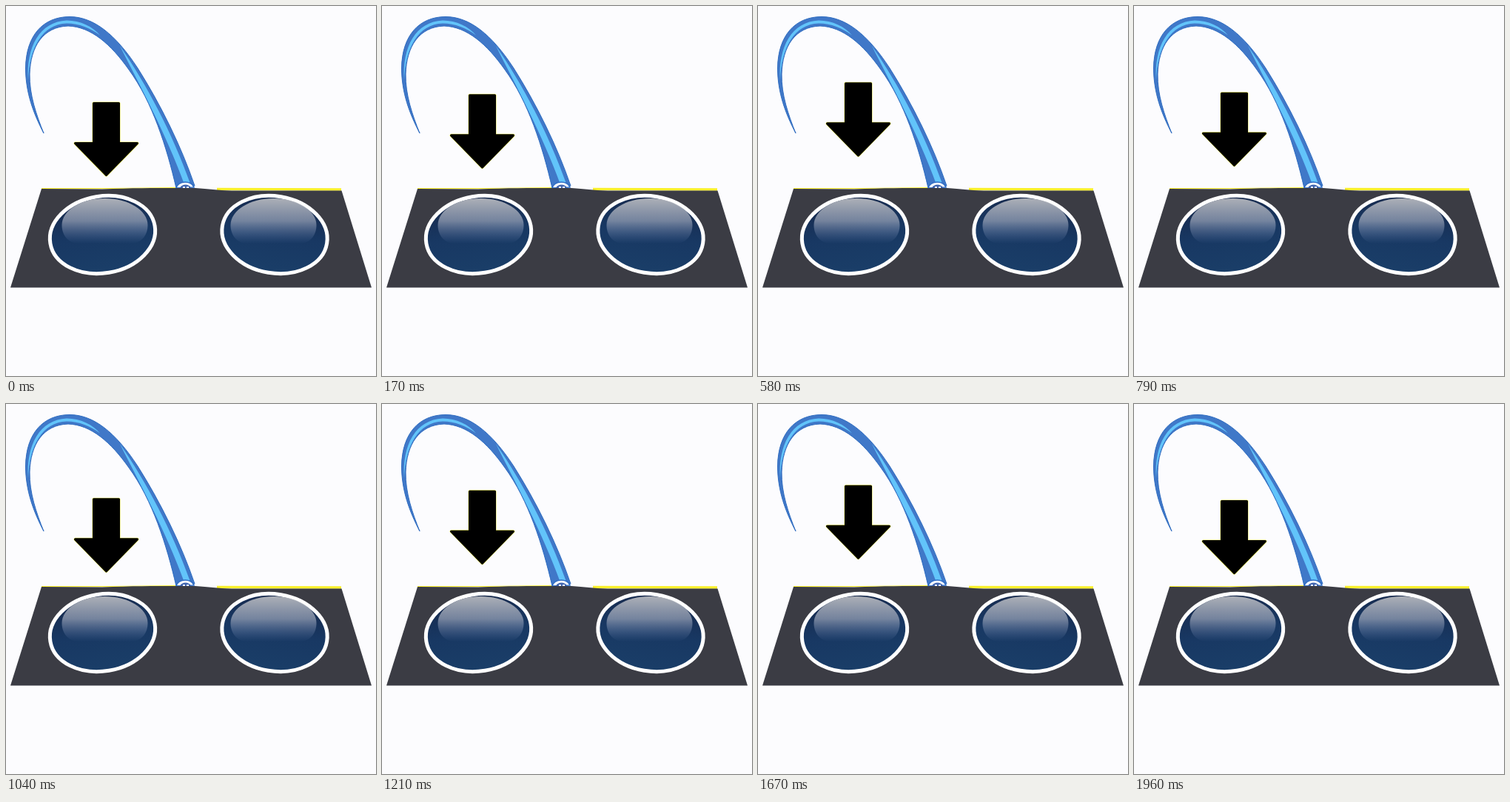
Recreate the animation shown at these times as an HTML page. Size 500 by 500 pixels, loop 2 s.

```html
<!DOCTYPE html>
<html lang="en">
<head>
<meta charset="utf-8">
<title>Glasses and arrow</title>
<style>
  html, body { margin: 0; width: 100%; height: 100%; overflow: hidden; background: #fcfcfe; }
  svg { display: block; width: 100vw; height: 100vh; }
</style>
</head>
<body>
<svg viewBox="0 0 500 500">
  <defs>
    <linearGradient id="glass" x1="0" y1="0" x2="0" y2="1">
      <stop offset="0" stop-color="#17294c"/>
      <stop offset=".5" stop-color="#183863"/>
      <stop offset="1" stop-color="#1a3e68"/>
    </linearGradient>
    <linearGradient id="shine" x1="0" y1="0" x2="0" y2="1">
      <stop offset="0" stop-color="#b4b7bd" stop-opacity=".95"/>
      <stop offset=".5" stop-color="#a4adc0" stop-opacity=".66"/>
      <stop offset="1" stop-color="#6c86b8" stop-opacity="0"/>
    </linearGradient>
    <ellipse id="lens" rx="71.6" ry="52" fill="url(#glass)" stroke="#fff" stroke-width="5"/>
    <path id="gloss" fill="url(#shine)"
      d="M75.500 296C75.500 276 102 260 133.500 260S191.500 276 191.500 296C191.500 310 183 321 168 321H99C84 321 75.500 310 75.500 296Z"/>
    <path id="pointer" d="M118.500 131.500H152.500V185.500H177.500L135.500 228.500L93.500 185.500H118.500Z"/>
  </defs>

  <!-- temple -->
  <path fill="#4078c8" stroke="#2f6cc0" stroke-width="1"
    d="M51 172C37 145 26.500 117 26.500 84C27 40 50 14.500 86 14.500C118 14.500 148 38 178 84C209 133 237 190 255 243L230 246C217 190 198 130 166 86C142 52 115 28 84 27C50 28 33 55 32 92C31.500 120 41 147 51 172Z"/>
  <g fill="#62c4fa">
    <path d="M30 100C27 55 46 21 82 19.500C101 19.500 117 28 127 39.500C114 30 99 23.500 82 23.500C49 25 32 55 30 100Z"/>
    <path d="M154 54C190 106 224 170 249 240L241 241C216 172 180 106 154 54Z"/>
  </g>
  <path d="M230 246C232 236 251 235 254 245Z" fill="#f4f8ff" stroke="#2f6cc4" stroke-width="1.500"/>
  <path d="M235 246C237 240 248 240 250 246" fill="#3c62ae"/>
  <path d="M239 245h3M244 245h3" stroke="#fff" stroke-width="2"/>

  <!-- frame -->
  <g fill="none" stroke="#fbf02a">
    <path d="M48 246.500L140 246.500L229 245.500"/>
    <path d="M285 247.400L453 248" stroke-width="3.400"/>
  </g>
  <path fill="#3b3c44" d="M48 247L130 247.500C170 246 200 246 230 246H256C274 247 285 249 305 249.500H453.500L494 380.500H6Z"/>
  <use href="#lens" transform="translate(130.500 309) rotate(-9.500)"/>
  <use href="#lens" transform="translate(363 309) rotate(9.500)"/>
  <use href="#gloss"/>
  <use href="#gloss" x="228"/>

  <g id="arrow" stroke-linejoin="round">
    <use href="#pointer" stroke="#eeee50" stroke-width="4"/>
    <use href="#pointer" stroke="#000" stroke-width="3"/>
  </g>
</svg>
<script>
  const LOOP = 2000, FPS = 24, LAST = 47;
  // step, lift in px
  const keys = [[0, 0], [12, 32], [24, 0], [36, 32], [LAST, 0]];
  const arrow = document.getElementById('arrow');

  function liftAt(step) {
    const i = Math.max(1, keys.findIndex(k => k[0] >= step));
    const [s0, y0] = keys[i - 1], [s1, y1] = keys[i];
    return y0 + (y1 - y0) * (step - s0) / (s1 - s0);
  }

  const start = performance.now();
  function draw(now) {
    const t = Math.max(0, now - start) % LOOP;
    // steps fall on whole hundredths of a second
    const step = Math.min(LAST, Math.floor((t + 5) * FPS / 1000));
    arrow.setAttribute('transform', `translate(0 ${-liftAt(step)})`);
    requestAnimationFrame(draw);
  }
  draw(start);
</script>
</body>
</html>
```
